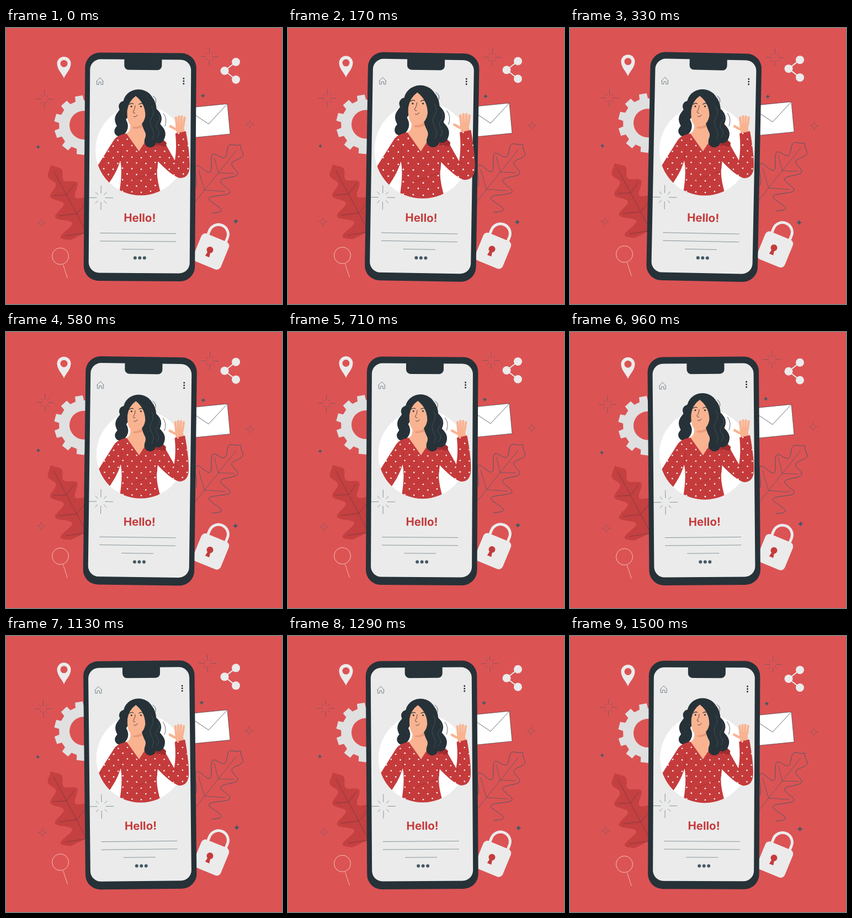
Write an HTML page with a canvas that moves like this. It is 500 by 500 pixels and loops after 1540 ms.

```html
<!DOCTYPE html>
<html lang="en">
<head>
<meta charset="utf-8">
<title>Hello</title>
<style>
html, body { margin: 0; width: 100%; height: 100%; overflow: hidden; background: #dc5354; }
canvas { display: block; width: 500px; height: 500px; }
</style>
</head>
<body>
<canvas id="stage" width="500" height="500"></canvas>
<script>
const ctx = document.getElementById('stage').getContext('2d');
const LOOP = 1540, TAU = 2 * Math.PI;
const C = { bg: '#dc5354', ink: '#263238', line: '#455a64', light: '#ebebeb', gear: '#e0e0e0',
  red: '#c53b3c', leaf: '#c44041', shade: '#a12c30', skin: '#f9b391', white: '#fff' };

// Motion: tilt and bob share one slow wave, the portrait swells in two beats
const phase = t => TAU * (t + 45) / LOOP;
const tilt = t => (.25 + .87 * Math.sin(phase(t))) * Math.PI / 180;
const bob = t => 4 * Math.cos(phase(t)) - 4;
function beat(t, peak) {
  const gap = Math.abs(t - peak), d = Math.min(gap, LOOP - gap) / 140;
  return Math.exp(-d * d);
}
const pulse = t => .977 + .088 * beat(t, 170) + .03 * beat(t, 900);

const shape = d => new Path2D(d);

function fill(path, color) {
  ctx.fillStyle = color;
  ctx.fill(path);
}

function stroke(path, color, width = .7) {
  ctx.strokeStyle = color;
  ctx.lineWidth = width;
  ctx.stroke(path);
}

function oval(x, y, rx, ry = rx) {
  const p = new Path2D();
  p.ellipse(x, y, rx, ry, 0, 0, TAU);
  return p;
}

const disc = (x, y, r, color) => fill(oval(x, y, r), color);

function box(x, y, w, h, r, color) {
  const p = new Path2D();
  p.roundRect(x, y, w, h, r);
  fill(p, color);
}

function group(draw) {
  ctx.save();
  draw();
  ctx.restore();
}

function makeGear(x, y, teeth) {
  const p = new Path2D();
  for (let i = 0; i < teeth; i++) {
    const a = 3.4 + i * TAU / teeth;
    for (const [side, r] of [[-.17, 45], [-.13, 54], [.13, 54], [.17, 45]])
      p.lineTo(x + r * Math.cos(a + side), y + r * Math.sin(a + side));
  }
  p.closePath();
  p.moveTo(x + 26, y);
  p.arc(x, y, 26, 0, TAU, true);
  return p;
}

// Lobed leaf along a straight axis; lobes narrow and lean towards the tip
function makeLeaf(x, y, tipX, tipY, width, first, lean) {
  const dx = tipX - x, dy = tipY - y, length = Math.hypot(dx, dy), period = .27;
  const point = (s, w) => {
    const along = s + lean * Math.abs(w) / length, across = w / length;
    return [x + dx * along - dy * across, y + dy * along + dx * across];
  };
  const half = s => width * (1 - s) ** .58 * (.68 + .32 * Math.cos(TAU * (s - first) / period));
  const outline = new Path2D(), veins = new Path2D();
  for (let s = 0; s < 1; s += .01) outline.lineTo(...point(s, half(s)));
  for (let s = 1; s > 0; s -= .01) outline.lineTo(...point(s, -half(s)));
  veins.moveTo(x, y);
  veins.lineTo(...point(.92, 0));
  for (let s = first; s < .8; s += period)
    for (const side of [-1, 1]) {
      veins.moveTo(...point(s - .04, 0));
      veins.lineTo(...point(s, side * half(s) * .8));
    }
  return { outline, veins };
}

const gear = makeGear(141, 176, 11);
const redLeaf = makeLeaf(149, 376, 81, 249, 48, .08, .2);
const lineLeaf = makeLeaf(333, 327, 425, 212, 49, .33, .5);

function drawLock() {
  ctx.translate(371.5, 405);
  ctx.rotate(.39);
  stroke(shape('M-17-24V-34A17.5 17.5 0 0 1 18-34V-24'), C.light, 5);
  box(-27, -27, 54, 54, 8, C.light);
  disc(-3, -2, 6, C.red);
  fill(shape('M-5 0H-1L1 11H-7Z'), C.red);
}

function drawFloating() {
  fill(gear, C.gear);
  fill(redLeaf.outline, C.leaf);
  stroke(redLeaf.veins, '#6b393e');
  stroke(lineLeaf.outline, C.line, 1);
  stroke(lineLeaf.veins, C.line);

  const envelope = shape('M310 146.5L401 137.5L406 192L315 201Z');
  fill(envelope, C.white);
  stroke(envelope, C.ink, .6);
  stroke(shape('M310 136L367 174L401 137.5'), C.ink);

  group(drawLock);

  fill(shape('M105 91C102 83 92.5 75 92.5 64.5A12.5 12.5 0 0 1 117.5 64.5C117.5 75 108 83 105 91Z'), C.light);
  disc(105, 64.5, 6.5, C.bg);

  for (const side of [-1, 1]) {
    const y = 77.5 + side * 16;
    stroke(shape(`M396 77.5L416.5 ${y}`), C.light, 2);
    disc(416.5, y, 7.5, C.light);
  }
  disc(396, 77.5, 7.5, C.light);

  stroke(oval(98.5, 413.5, 15), '#f1c3b9', 1);
  stroke(shape('M103.5 429L111.5 453'), '#efb9b0', 1);
}

function sparkle(x, y, r) {
  const p = new Path2D();
  for (let i = 0; i < 8; i++) {
    const c = r * Math.cos(i * TAU / 8), s = r * Math.sin(i * TAU / 8), end = i % 2 ? .65 : 1;
    p.moveTo(x + c * .35, y + s * .35);
    p.lineTo(x + c * end, y + s * end);
  }
  stroke(p, C.line, .6);
}

function diamond(x, y, r) {
  const q = r * .2;
  group(() => {
    ctx.translate(x, y);
    fill(shape(`M0 ${-r}Q${q} ${-q} ${r} 0Q${q} ${q} 0 ${r}Q${-q} ${q} ${-r} 0Q${-q} ${-q} 0 ${-r}`), C.line);
  });
}

function drawPhone() {
  box(142, 45, 201.5, 413.5, 27, C.ink);
  box(151, 57, 183, 387, 19, C.light);
  box(213, 50, 68, 26, 8, C.ink);

  stroke(shape('M162.5 97.5L169 90.5L175.5 97.5M163.5 96.5V103H167V98.5H171V103H174.5V96.5'), C.line);
  for (let i = 0; i < 3; i++) {
    disc(320.8, 91 + i * 4.7, 1.5, C.ink);
    disc(235 + i * 8.5, 416.5, 3, C.line);
  }

  ctx.fillStyle = C.red;
  ctx.font = '700 20.5px Inter, sans-serif';
  ctx.textAlign = 'center';
  ctx.fillText('Hello!', 243, 351);
  stroke(shape('M171 372H309M171 386.5H309M211 401H269'), C.line, .6);
}

function drawSparkles() {
  sparkle(367, 51, 16);
  sparkle(69, 130, 16);
  sparkle(441, 173.5, 8);
  sparkle(65, 354, 8);
  sparkle(172.5, 308, 22);
  diamond(355.8, 122, 4);
  diamond(58, 217, 3.8);
  diamond(417, 349, 5);
}

// Wavy lock of hair drawn as a thick line
function strand(x, y, endX, endY, width, color = C.ink) {
  const p = new Path2D();
  for (let s = 0; s <= 1; s += .05)
    p.lineTo(x + (endX - x) * s + 3 * Math.sin(s * 10), y + (endY - y) * s);
  stroke(p, color, width);
}

function polka(path) {
  fill(path, C.red);
  group(() => {
    ctx.clip(path);
    for (let row = 0; row < 12; row++)
      for (let col = 0; col < 11; col++)
        disc(160 + col * 17 + row % 2 * 8.5, 191 + row * 10.5 + col % 3, 1.3, C.white);
  });
}

const portrait = oval(244, 221.5, 82);
const torso = shape('M219 191Q200 194 194 205L158 262L178 292Q200 265 207 240Q212 265 203 310H284Q272 275 274 255L280 200L250 192L241 223Z');
const arm = shape('M262 196L280 194L306 240Q310 218 307 191L326 187Q333 225 333 249Q333 272 315 272Q300 268 274 240Z');
const neck = shape('M225 166H251V188L256 200L241 223L218 191Q225 188 225 178Z');
const face = shape('M235 123Q222 132 219.5 149Q218 178 233 179Q250 177 252.5 158Q252 136 235 123Z');

function drawHand() {
  ctx.lineCap = 'round';
  stroke(shape('M317 191L315 181'), C.skin, 15);
  stroke(shape('M307 183L298 178'), C.skin, 4.5);
  for (let i = 0; i < 4; i++) {
    const spread = i - 1.5, reach = 160 + spread * spread;
    stroke(shape(`M${315.5 + spread * 4} 178L${316 + spread * 5.2} ${reach}`), C.skin, 4.2);
  }
}

function drawFace() {
  for (const x of [227, 244.5]) {
    disc(x, 142, 1.5, C.ink);
    stroke(shape(`M${x - 4} 138.5Q${x} 135 ${x + 4} 137.5`), C.ink, 1.1);
  }
  stroke(shape('M234 140Q234 147 230 152Q231 155 234 154M231 160Q236 162 238 157'), '#49363b', .9);
}

function drawWoman() {
  fill(portrait, C.white);
  group(() => {
    ctx.lineCap = 'round';
    strand(214, 142, 206, 189, 20);
  });
  group(() => {
    ctx.clip(portrait);
    polka(torso);
    stroke(shape('M207 241L209 216M227 276Q250 268 272 260'), C.shade);
  });
  group(drawHand);
  polka(arm);
  stroke(shape('M306 240L312 244M274 241V255'), C.shade);
  fill(shape('M276 194L291 208L290 215L272 213Z'), C.shade);

  fill(neck, C.skin);
  fill(shape('M230 179Q246 179 251 168V175Q245 184 230 182Z'), '#e99b7b');
  group(() => {
    ctx.lineCap = 'round';
    strand(258, 134, 262, 209, 22);
    strand(266, 155, 277, 200, 22);
  });
  fill(oval(240, 137, 28, 26), C.ink);
  fill(face, C.skin);
  drawFace();

  strand(264, 142, 265, 205, .6, '#52616a');
  strand(276, 156, 274, 200, .6, '#52616a');
  stroke(shape('M215 135Q205 136 209 150M266 123Q276 128 269 140M285 154Q293 164 288 178'), C.ink);
}

function frame(t) {
  const s = pulse(t);
  ctx.fillStyle = C.bg;
  ctx.fillRect(0, 0, 500, 500);

  group(() => {
    ctx.translate(0, bob(t));
    drawFloating();
  });

  const tilted = draw => group(() => {
    ctx.translate(242.5, 251.5);
    ctx.rotate(tilt(t));
    ctx.translate(-242.5, -251.5);
    draw();
  });
  tilted(drawPhone);
  group(() => {
    ctx.translate(244.5, 221);
    ctx.scale(s, s);
    ctx.translate(-244.5, -221);
    drawWoman();
  });
  tilted(drawSparkles);
}

const start = performance.now();
function tick() {
  frame((performance.now() - start) % LOOP);
  requestAnimationFrame(tick);
}
tick();
</script>
</body>
</html>
```
